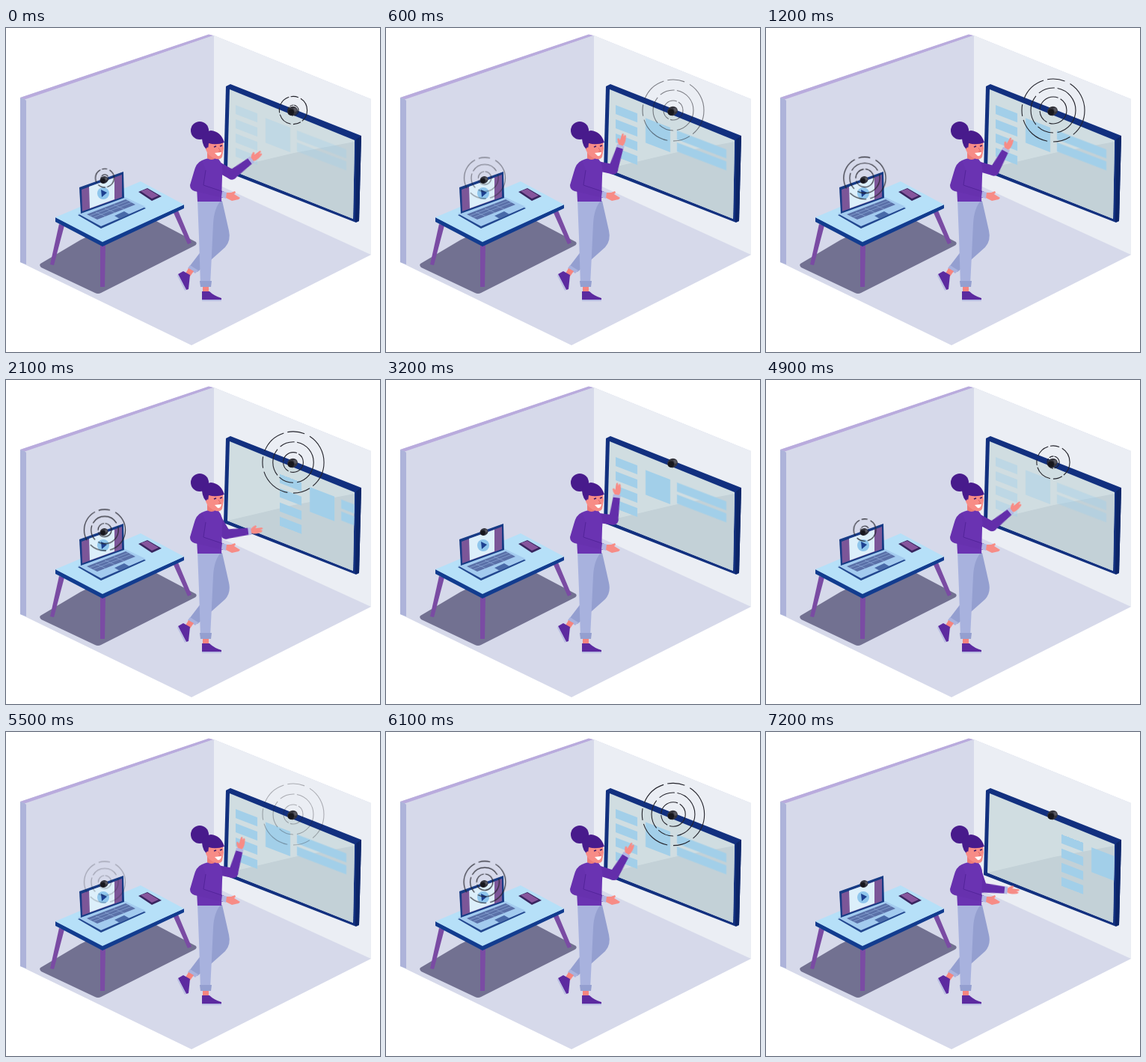
Animation, 500 px wide and 433 px high, one loop 7.3 s. Source, as an HTML page without scripts:

```html
<!DOCTYPE html>
<html lang="en">
<head>
<meta charset="utf-8">
<title>Smart classroom</title>
<style>
  :root { --cycle: calc(7.3s / 3); --pulse: calc(7.3s / 9); }
  html, body { margin: 0; width: 100%; height: 100%; overflow: hidden; background: #fff; }
  svg { display: block; width: 100vw; height: 100vh; }

  .slides { fill: #a2cfe9; animation: slide var(--cycle) linear infinite; }
  .forearm { animation: wave var(--cycle) linear infinite; }
  .upper { animation: lift var(--cycle) linear infinite; }
  .rings { fill: none; stroke: #23232b; animation: fade var(--pulse) linear infinite; }
  .rings circle { stroke-width: 1.1; vector-effect: non-scaling-stroke; }
  .outer { stroke-dasharray: 14 2 9 3 17 2 6 3; animation: outer var(--pulse) linear infinite; }
  .middle { stroke-dasharray: 22 3 12 2; animation: middle var(--pulse) linear infinite; }
  .inner { stroke-dasharray: 30 3 16 2; animation: inner var(--pulse) linear infinite; }

  @keyframes slide {
    0% { opacity: .36; transform: translateX(0); }
    14% { opacity: 1; }
    66% { transform: translateX(0); }
    86.3% { transform: translateX(59px); }
    95.9% { transform: translateX(88px); }
    100% { opacity: 1; transform: translateX(100px); }
  }
  @keyframes wave {
    0% { transform: translate(302px, 196px) rotate(-37deg); }
    31.5% { transform: translate(304px, 187px) rotate(-82deg); }
    35% { transform: translate(304px, 187px) rotate(-84deg); }
    49.3% { transform: translate(305px, 191px) rotate(-61deg); }
    86.3% { transform: translate(294px, 206px) rotate(-7deg); }
    95.9% { transform: translate(289px, 208px) rotate(6deg); }
    100% { transform: translate(288px, 208px) rotate(9deg); }
  }
  @keyframes lift {
    0% { d: path("M281 184L302 196"); }
    31.5%, 35% { d: path("M281 184L304 187"); }
    49.3% { d: path("M281 184L305 191"); }
    86.3% { d: path("M281 184L294 206"); }
    95.9% { d: path("M281 184L289 208"); }
    100% { d: path("M281 184L288 208"); }
  }
  @keyframes fade { 0%, 66% { opacity: 1; } 84%, 100% { opacity: 0; } }
  @keyframes outer { 0% { r: 18.5px; } 4.1% { r: 22px; } 28% { r: 40px; } 48% { r: 42px; } 60%, 100% { r: 41px; } }
  @keyframes middle { 0% { r: 7px; } 4.1% { r: 8px; } 28% { r: 24px; } 48% { r: 30px; } 60%, 100% { r: 27px; } }
  @keyframes inner { 0%, 4.1% { r: 0px; } 28% { r: 11px; } 48% { r: 18px; } 60%, 100% { r: 13px; } }
</style>
</head>
<body>
<svg viewBox="0 0 500 433" preserveAspectRatio="none">
  <defs>
    <clipPath id="screen"><path d="M299 82L466 150L464 255L296 188Z"/></clipPath>
    <g id="camera">
      <ellipse rx="7" ry="6" fill="#35353d" transform="rotate(-20)"/>
      <circle cx="-2" cy="1.5" r="4" fill="#17171d"/>
      <path d="M1 -4L5 -4L6 0L3 1Z" fill="#56565f"/>
    </g>
  </defs>

  <!-- Room -->
  <path d="M19 93L271 9L278 10L488 95V303L248 424L19 313Z" fill="#d6d9ea"/>
  <path d="M278 10L488 95V303L278 207Z" fill="#ebeef4"/>
  <path d="M19 93L27 95V316L19 313Z" fill="#adb3da"/>
  <path d="M19 93L271 8.5L277 10L27 95.5Z" fill="#b9abdd"/>
  <path d="M25 95.5L277 10.5L278 12L27 97Z" fill="#d6d9ea"/>

  <!-- Board -->
  <path d="M294 78L300 75L475 144L472 258L468 260L291 191Z" fill="#12307f"/>
  <path d="M468 149L475 144L472 258L467 259Z" fill="#0c2568"/>
  <path d="M299 82L466 150L464 255L296 188Z" fill="#d0dde1"/>
  <path d="M296 188L385 167L466 152L464 255Z" fill="#c3d1d7"/>
  <g clip-path="url(#screen)">
    <g transform="translate(307 103) skewY(21)">
      <g class="slides">
        <rect width="29" height="12"/>
        <rect y="19" width="29" height="12"/>
        <rect y="38" width="29" height="12"/>
        <rect y="57" width="29" height="12"/>
        <rect x="40" y="2" width="33" height="33"/>
        <rect x="82" y="2.5" width="66" height="12"/>
        <rect x="82" y="18.5" width="66" height="12"/>
      </g>
    </g>
  </g>
  <use href="#camera" x="383" y="111"/>
  <g transform="translate(384 110)">
    <g class="rings">
      <circle class="outer" pathLength="100"/>
      <circle class="middle" pathLength="100"/>
      <circle class="inner" pathLength="100"/>
    </g>
  </g>

  <!-- Table -->
  <path d="M46 315L100 283L178 246L254 286Q256 289 252 291L127 354Q123 356 119 354L47 320Q44 317 46 315Z" fill="#727191"/>
  <g fill="#7a4ba3">
    <path d="M71 262L78 264L64 317L59 316Z"/>
    <path d="M126 289H133L132 346H126Z"/>
    <path d="M224 247L230 244L248 287L243 289Z"/>
  </g>
  <path d="M66 253L129 285L238 236V241L129 292L66 259Z" fill="#123c8f"/>
  <path d="M66 253L180 205L238 236L129 286Z" fill="#b6e0f8"/>

  <!-- Laptop and phone -->
  <path d="M96 250L157 227L187 241L127 268Z" fill="#22478f"/>
  <path d="M96 248L157 225L187 239L127 265Z" fill="#a3cbef"/>
  <path d="M108 249L160 229L173 236L122 256Z" fill="#5a70a8"/>
  <path d="M112 251L163 231M117 253L168 233M120 246L134 252M132 241L146 247M144 236L158 242" stroke="#86a1d1" stroke-width=".8"/>
  <path d="M145 251L158 245L165 249L152 255Z" fill="#496aa8"/>
  <path d="M98 213L157 192L158 227L100 248Z" fill="#173b85"/>
  <path d="M101 216L155 196V226L102 245Z" fill="#7c5698"/>
  <path d="M111 212L145 200V229L112 241Z" fill="#dceffa"/>
  <circle cx="130" cy="221" r="8" fill="#8fc6ec"/>
  <path d="M127 216L135 220L128 226Z" fill="#1d4090"/>
  <path d="M177 219L189 214L208 225L195 231Z" fill="#38265f"/>
  <path d="M180 218L189 215L204 224L195 228Z" fill="#86559c"/>
  <use href="#camera" transform="translate(131 203) scale(.8)"/>
  <g transform="translate(132 200.5) scale(.67)">
    <g class="rings">
      <circle class="outer" pathLength="100"/>
      <circle class="middle" pathLength="100"/>
      <circle class="inner" pathLength="100"/>
    </g>
  </g>

  <!-- Legs -->
  <path d="M270 231H289L298 271Q301 284 293 293L256 326L245 319L274 281Z" fill="#949fd0"/>
  <path d="M246 317L257 324L253 328L243 321Z" fill="#a9b2de"/>
  <path d="M244 321L251 325L246 332L240 328Z" fill="#f5857f"/>
  <path d="M237 325L246 330L244 349L241 350L230 329Z" fill="#5c2aa0"/>
  <path d="M230 329L241 350L239 351L229 331Z" fill="#b9bde2"/>
  <path d="M256 230H288Q278 240 277 262L273 344H260L258 280Z" fill="#a8b2de"/>
  <path d="M259 338H275L274 346H260Z" fill="#949fd0"/>
  <path d="M263 346H271V354H263Z" fill="#f5857f"/>
  <path d="M262 352H272Q278 358 288 361V363H262Z" fill="#5c2aa0"/>
  <path d="M262 363H288V365H262Z" fill="#b9bde2"/>

  <!-- Raised arm -->
  <path class="upper" d="M281 184L302 196" fill="none" stroke="#632eaa" stroke-width="13" stroke-linecap="round"/>
  <g class="forearm">
    <path d="M0 -6.5L31 -4.5V4.5L0 6.5A6.5 6.5 0 0 1 0 -6.5Z" fill="#632eaa"/>
    <path d="M30 -5H34V5H30Z" fill="#b4b8e3"/>
    <path d="M34 -3Q37 -6 41 -7L42 -5L40 -3L49 -3L50 -1L46 0L49 1L48 3L43 4Q38 5 34 3Z" fill="#f78c86"/>
  </g>

  <!-- Torso and lowered arm -->
  <path d="M262 177Q274 171 284 175Q291 182 289 198L288 232H256L254 192Z" fill="#6a33b2"/>
  <path d="M262 177Q254 180 251 193L246 210Q246 216 252 218L290 227L292 219L264 210L267 190Z" fill="#6731ae"/>
  <path d="M267 190L264 210L291 219" fill="none" stroke="#53249a"/>
  <path d="M289 218L296 220L294 228L288 226Z" fill="#b4b8e3"/>
  <path d="M295 220L301 220L306 218L307 220L305 222L313 227L311 229L302 231L294 227Z" fill="#f78c86"/>

  <!-- Head -->
  <path d="M269 162H280V174Q275 178 269 174Z" fill="#ee7c78"/>
  <path d="M267 150H290L291 161L289 172Q287 176 281 175Q270 172 267 162Z" fill="#f78c86"/>
  <circle cx="259" cy="137" r="12" fill="#481b8c"/>
  <path d="M262 148Q263 138 274 137Q287 138 292 153Q281 157 271 154L270 163Q263 160 262 148Z" fill="#481b8c"/>
  <path d="M278 159L281 158M286 158L289 157" stroke="#35156c" stroke-width="1.4"/>
  <path d="M284 160L287 165L284 165" fill="none" stroke="#d9625f" stroke-width=".8"/>
  <path d="M279 167L288 166Q287 172 283 171Z" fill="#fff"/>
  <circle cx="270" cy="162" r="2.5" fill="#f78c86"/>
</svg>
</body>
</html>
```
